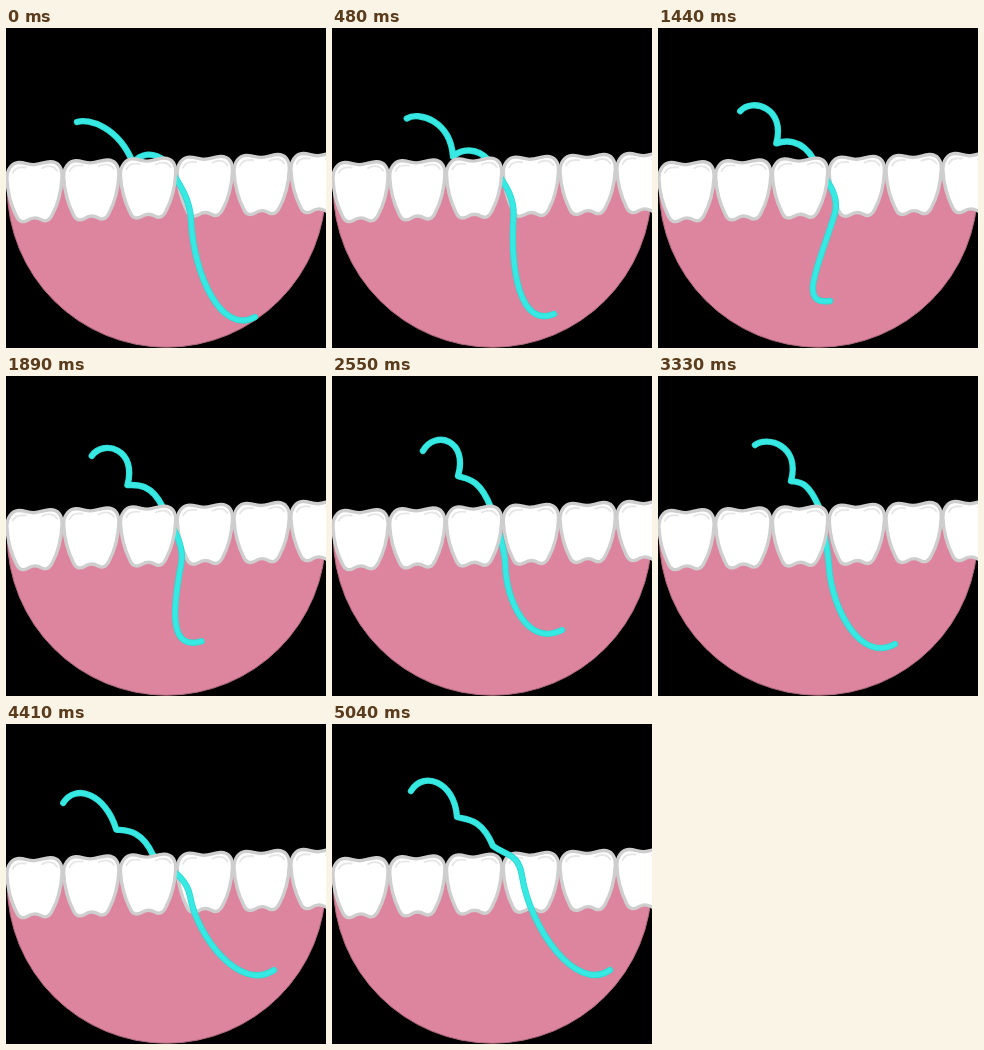
Animation, 320 px wide and 320 px high, one loop 5.07 s. Source, as an HTML page with a canvas:

```html
<!DOCTYPE html>
<html>
<head>
<meta charset="utf-8">
<style>
html, body { margin: 0; width: 100%; height: 100%; overflow: hidden; background: #000; }
canvas { display: block; width: 320px; height: 320px; }
</style>
</head>
<body>
<canvas id="stage" width="320" height="320"></canvas>
<script>
const ctx = document.getElementById('stage').getContext('2d');
const LOOP = 5070, STEP = 30;

// Turning points [time, x, y] of the five joints of the thread.
const joints = {
  tip: [[0, 71, 94], [3330, 97, 69], [4140, 48, 84], [5040, 79, 67]],
  dip: [[0, 127, 135], [960, 115, 122], [2550, 126, 100], [3330, 133, 105], [4140, 104, 111], [5040, 125, 93]],
  gap: [[0, 159, 133], [960, 154, 131], [3330, 161, 131], [4410, 147, 131], [5040, 161, 122]],
  knee: [[0, 185, 192], [960, 178, 185], [3330, 171, 191], [4410, 184, 172], [5040, 190, 152]],
  end: [[0, 249, 289], [960, 195, 283], [1440, 172, 273], [2550, 230, 254], [3330, 237, 268], [4410, 268, 246], [5040, 278, 246]]
};

const outline = new Path2D(
  'M1.2 18C.7 9 6 2 13 2C19 2 22 4.5 28 4.5C34 4.5 38 2 44 2C52 2 56.3 8 55.8 17' +
  'C55 33 51 45 46 54C43 60 39 60.5 35.5 58.5C31 55.8 26 55.8 22 58.5' +
  'C17 61 13 60 10.5 54C6 45 2 33 1.2 18Z');
const shine = new Path2D('M7 12C9 7 14 6 20 7M36 8C42 5 48 6 51 11');

function at(keys, t) {
  let i = 0;
  while (i < keys.length - 2 && t >= keys[i + 1][0]) i++;
  const [t0, x0, y0] = keys[i], [t1, x1, y1] = keys[i + 1];
  const k = (t - t0) / (t1 - t0);
  return { x: x0 + (x1 - x0) * k, y: y0 + (y1 - y0) * k };
}

function gum() {
  ctx.save();
  ctx.beginPath();
  ctx.rect(0, 147, 320, 173);
  ctx.clip();
  ctx.beginPath();
  ctx.arc(160.5, 160, 159.2, 0, Math.PI * 2);
  ctx.fillStyle = '#dd859e';
  ctx.fill();
  ctx.lineWidth = 1;
  ctx.strokeStyle = '#b06b7f';
  ctx.stroke();
  ctx.restore();
}

function tooth(i) {
  ctx.save();
  ctx.translate(56.8 * i - 0.3, 132.4 - 1.8 * i);
  ctx.transform(1.01, -0.025, 0, 1.025, 0, 0.4);
  ctx.fillStyle = '#fff';
  ctx.fill(outline);
  ctx.lineWidth = 1.8;
  ctx.strokeStyle = '#e6e6e6';
  ctx.stroke(shine);
  ctx.lineWidth = 3.3;
  ctx.strokeStyle = '#cecece';
  ctx.stroke(outline);
  ctx.restore();
}

// The bends follow from how far apart neighbouring joints are.
function thread(t) {
  const [tip, dip, gap, knee, end] = Object.values(joints).map(keys => at(keys, t));
  const arch = dip.x - tip.x, rise = dip.y - tip.y, fall = gap.y - dip.y;
  const reach = end.x - knee.x;
  const bendX = 0.24 * reach - 13, bendY = 0.55 * (end.y - knee.y);

  ctx.beginPath();
  ctx.moveTo(tip.x, tip.y);
  ctx.bezierCurveTo(
    tip.x + 12, tip.y + 1.1 * rise - 49,
    dip.x + 1.2 * (44 - arch), dip.y - 36,
    dip.x, dip.y);
  ctx.bezierCurveTo(
    dip.x + 8, dip.y + 0.4 * fall - 9,
    gap.x - 12, gap.y - 11 - 0.62 * fall,
    gap.x, gap.y);
  ctx.bezierCurveTo(
    gap.x + 0.45 * (knee.x - gap.x), gap.y + 0.33 * (knee.y - gap.y),
    knee.x - 0.45 * bendX, knee.y - 0.45 * bendY,
    knee.x, knee.y);
  ctx.bezierCurveTo(
    knee.x + bendX, knee.y + bendY,
    end.x - 34, end.y + 6 + 0.2 * reach,
    end.x, end.y);

  ctx.lineWidth = 6.4;
  ctx.strokeStyle = '#30d6d1';
  ctx.stroke();
  ctx.lineWidth = 4.8;
  ctx.strokeStyle = '#36e9e3';
  ctx.stroke();
}

function draw(now) {
  const t = Math.floor((now % LOOP) / STEP) * STEP;
  ctx.fillStyle = '#000';
  ctx.fillRect(0, 0, 320, 320);
  gum();
  [0, 1, 3, 4, 5].forEach(tooth);
  thread(t);
  tooth(2);
}

ctx.lineCap = ctx.lineJoin = 'round';
let start;
function tick(now) {
  if (start === undefined) start = now;
  draw(Math.max(0, now - start));
  requestAnimationFrame(tick);
}
draw(0);
requestAnimationFrame(tick);
</script>
</body>
</html>
```
